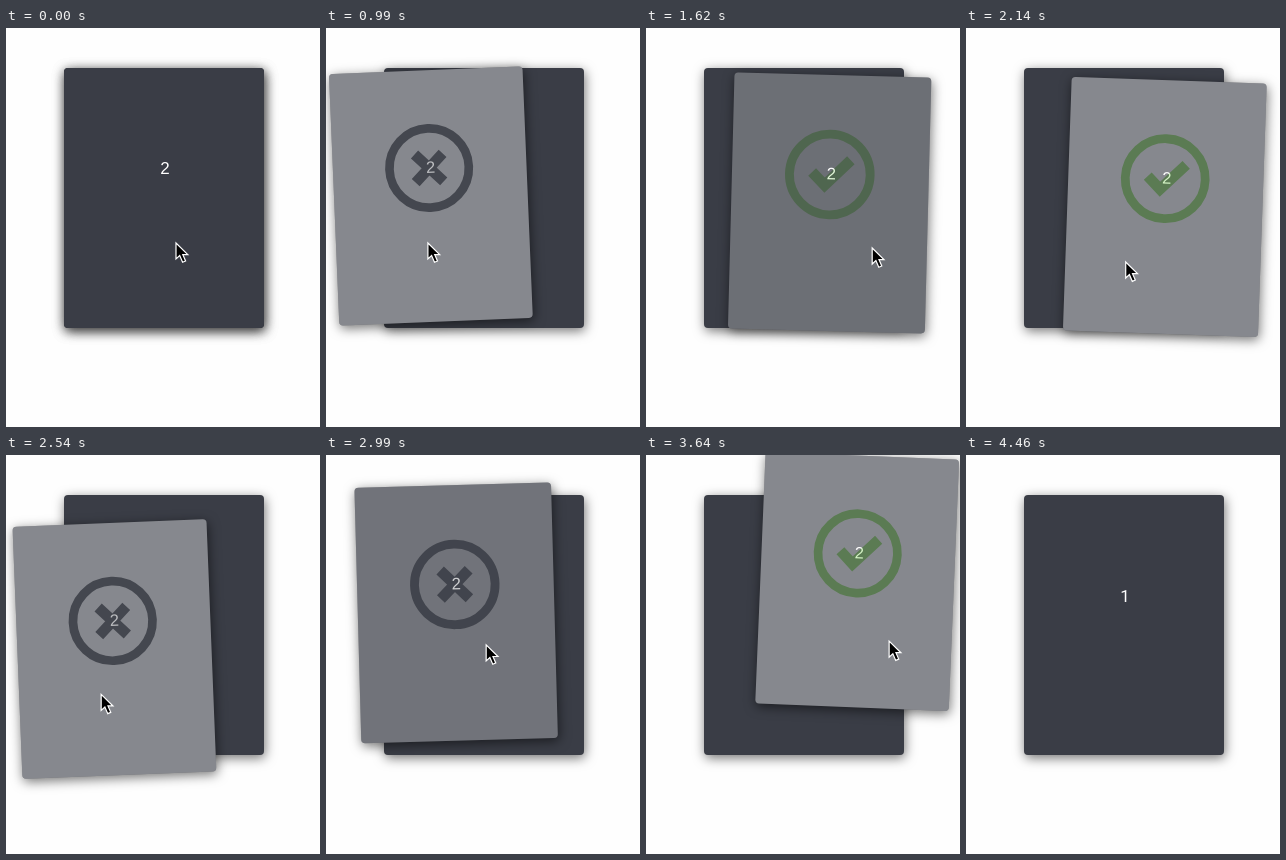
Animation, 314 px wide and 399 px high, one loop 4.89 s. Source, as an HTML page:

```html
<!DOCTYPE html>
<html lang="en">
<head>
<meta charset="utf-8">
<title>Swipe cards</title>
<style>
html, body { margin: 0; width: 100%; height: 100%; overflow: hidden; background: #fefefe; }
.card {
  position: absolute; left: 58px; top: 40px; width: 200px; height: 260px;
  border-radius: 4px; background: #3a3d46; box-shadow: 1px 3px 12px rgba(0, 0, 0, .55);
  color: #fff; font: 17px/20px "Liberation Sans", Arial, sans-serif;
}
.card b { position: absolute; left: 1px; top: 91px; width: 100%; text-align: center; font-weight: 400; }
.under b { font-family: Roboto, sans-serif; }
#tint { position: absolute; inset: 0; border-radius: 4px; background: #fff; opacity: 0; }
#tint svg { position: absolute; left: 0; top: 0; fill: none; }
#cursor { position: absolute; left: 0; top: 0; overflow: visible; }
</style>
</head>
<body>
<div class="card under"><b>1</b></div>
<div class="card" id="top">
  <b>2</b>
  <div id="tint">
    <svg width="200" height="260">
      <g id="icon" transform="translate(99.4 101)">
        <circle r="41" stroke-width="9"/>
        <path id="mark" stroke-width="11"/>
      </g>
    </svg>
  </div>
</div>
<svg id="cursor" width="14" height="21">
  <path d="M0 0V16l3.7-3.4 2.9 6.7 3-1.3-2.8-6.4h5z" stroke="#fff" stroke-width="1.2"/>
</svg>
<script>
const LOOP = 4890, GONE = 4460;
const el = id => document.getElementById(id);
const card = el('top'), tint = el('tint'), icon = el('icon'), mark = el('mark'), cursor = el('cursor');

// [ms, x, y]: card offset, trailing behind the pointer
const drag = [
  [590, 0, 0], [720, -13, 0], [990, -53, -2], [1100, -62, -2], [1200, -57, 0],
  [1380, -22, 2], [1620, 25.5, 5], [1880, 56, 8], [1990, 58, 8], [2140, 41, 9],
  [2250, 12, 13], [2400, -26, 20], [2640, -60, 25], [2820, -54, 18], [2990, -28, -12],
  [3200, 2, -27], [3420, 26, -36], [3640, 53, -43.5], [3800, 85, -40], [3960, 122, -31],
  [4200, 205, 5], [4440, 310, 50]
];
// [ms, x, y]: pointer tip
const pointer = [
  [590, 170, 215], [720, 146, 215], [990, 102, 215], [1100, 108, 215], [1250, 142, 217],
  [1620, 226, 220], [1800, 243, 222], [1980, 210, 228], [2140, 160, 234], [2300, 117, 240],
  [2500, 96, 241], [2650, 101, 231], [2820, 126, 211], [2990, 160, 190], [3200, 189, 178],
  [3440, 215, 177], [3640, 243, 186], [3960, 284, 240], [4350, 302, 404]
];

// Smooth curve through the keys, at rest at both ends
function at(keys, t) {
  const last = keys.length - 1;
  if (t <= keys[0][0]) return keys[0].slice(1);
  if (t >= keys[last][0]) return keys[last].slice(1);
  const i = keys.findIndex(k => k[0] > t) - 1;
  const a = keys[i], b = keys[i + 1], span = b[0] - a[0], u = (t - a[0]) / span;
  const slope = (j, c) => j === 0 || j === last ? 0 :
    (keys[j + 1][c] - keys[j - 1][c]) / (keys[j + 1][0] - keys[j - 1][0]) * span;
  return [1, 2].map(c => {
    const m = slope(i, c), n = slope(i + 1, c), d = b[c] - a[c];
    return a[c] + u * (m + u * (3 * d - 2 * m - n + u * (m + n - 2 * d)));
  });
}

function draw(now) {
  const t = now % LOOP;
  const [x, y] = at(drag, t), [px, py] = at(pointer, t);
  const far = Math.abs(x), right = x > 0;
  const angle = Math.sign(x) * .179 * far ** .65;
  card.style.transform = `translate(${x}px, ${y}px) rotate(${angle}deg) scale(${1 - far * .0006})`;
  card.style.visibility = cursor.style.visibility = t < GONE ? 'visible' : 'hidden';
  tint.style.opacity = Math.min(far / 100, .39);
  icon.setAttribute('stroke', right ? '#8fde69' : '#55585f');
  mark.setAttribute('d', right ? 'M-18-2-5 11 21-15' : 'M-14.5-14.5 14.5 14.5M14.5-14.5-14.5 14.5');
  cursor.style.transform = `translate(${px}px, ${py}px)`;
}

const start = performance.now();
function tick() {
  draw(performance.now() - start);
  requestAnimationFrame(tick);
}
tick();
</script>
</body>
</html>
```
